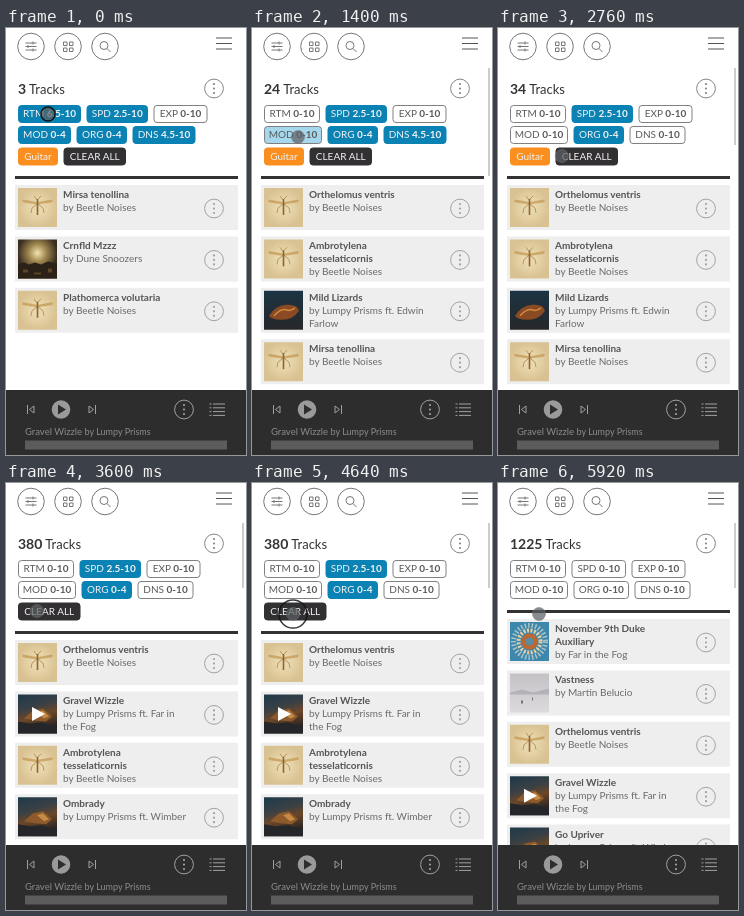
Recreate the animation shown at these times as an HTML page. Size 240 by 427 pixels, loop 6 s.

```html
<!DOCTYPE html>
<html lang="en">
<head>
<meta charset="utf-8">
<title>Track filter</title>
<style>
html, body { margin: 0; height: 100%; overflow: hidden; background: #fff; }
svg { display: block; width: 100vw; height: 100vh; }
text { font: 10px Lato, "Open Sans", sans-serif; fill: #6a6a6a; white-space: pre; }
.b { font-weight: 700; }
text.b { fill: #555; }
.line { fill: none; stroke: #777; }
.pale { fill: none; stroke: #a0a0a0; }
</style>
</head>
<body>
<svg id="stage" viewBox="0 0 240 427">
  <defs>
    <radialGradient id="paper"><stop offset=".3" stop-color="#e9d8ae"/><stop offset="1" stop-color="#d9c292"/></radialGradient>
    <radialGradient id="glow" cy=".35"><stop offset="0" stop-color="#f3e3ae"/><stop offset=".45" stop-color="#a08850"/><stop offset="1" stop-color="#3b2e20"/></radialGradient>
    <linearGradient id="night" x2="0" y2="1"><stop offset="0" stop-color="#1b3443"/><stop offset="1" stop-color="#27272b"/></linearGradient>
    <linearGradient id="dusk" x2=".3" y2="1"><stop offset="0" stop-color="#1d3a4a"/><stop offset=".4" stop-color="#3a4045"/><stop offset=".65" stop-color="#6b4728"/><stop offset="1" stop-color="#2a2422"/></linearGradient>
    <linearGradient id="haze" x2="0" y2="1"><stop offset="0" stop-color="#c3c1c5"/><stop offset="1" stop-color="#dddadd"/></linearGradient>
    <g id="bug">
      <path fill="url(#paper)" d="M0 0h39v39H0z"/>
      <path fill="#c49a55" opacity=".75" d="M19 14 5 11.500q-2 2 1 3l13 2 14-2q3-1 1-3L20 14z"/>
      <path stroke="#a27a40" stroke-width=".7" fill="none" d="M16 8l3 4 4-4M19 16l-5 4-1 5M20 16l5 4 1 5"/>
      <path stroke="#8f652f" stroke-width="1.600" d="M19.500 11v16"/>
    </g>
    <g id="field">
      <path fill="url(#glow)" d="M0 0h39v39H0z"/>
      <path fill="#2a2117" d="M0 25l6-2 5 2 6-2 6 2 7-3 9 2v15H0z"/>
      <path fill="#5b4627" d="M5 30h5v3H5zm11 3h7v2h-7zm14-4h4v4h-4z"/>
    </g>
    <g id="blobs"><path fill="#191d29" d="M0 0h39v39H0z"/></g>
    <g id="ember">
      <path fill="url(#night)" d="M0 0h39v39H0z"/>
      <path fill="#8a4a24" d="M5 25q6-10 17-11t13 6q-6 9-17 9T5 25z"/>
      <path fill="none" stroke="#d08a40" stroke-width="1.500" d="M10 25q7-8 12-6t9-2"/>
    </g>
    <g id="rock">
      <path fill="url(#dusk)" d="M0 0h39v39H0z"/>
      <path fill="#8d5a2c" d="M6 24l9-8 10-2 9 8-6 5-12-1z"/>
      <path fill="#c58a45" d="M19 18l6-2 6 6-5 2z"/>
      <path fill="#252629" d="M0 27l12 2 12-1 15 4v7H0z"/>
    </g>
    <g id="wheel">
      <path fill="#3d86ac" d="M0 0h39v39H0z"/>
      <g fill="none"><circle cx="19.500" cy="19.500" r="16" stroke="#a9c3c6" stroke-width="5" stroke-dasharray="1.500 2"/>
      <circle cx="19.500" cy="19.500" r="11" stroke="#e3cfa6" stroke-width="4" stroke-dasharray="2 1.500"/></g>
      <circle cx="19.500" cy="19.500" r="8" fill="#c0672f"/><circle cx="19.500" cy="19.500" r="4" fill="#5b8ba0"/>
    </g>
    <g id="mist">
      <path fill="url(#haze)" d="M0 0h39v39H0z"/>
      <path fill="#b4b2b8" d="M0 19l12-3 11 3 16-4v6H0z"/>
      <path fill="#77757b" d="M11 27h2v3h-2zm11-3h1v3h-1z"/>
    </g>
    <g id="kebab"><circle r="9.400" fill="none" stroke="currentColor"/>
      <path stroke="currentColor" stroke-width="2.200" stroke-linecap="round" d="M0-4.500v0M0 0v0M0 4.500v0"/></g>
  </defs>

  <g id="view"></g>

  <g class="line">
    <circle cx="25" cy="18.500" r="13.300"/><circle cx="62" cy="18.500" r="13.300"/><circle cx="99" cy="18.500" r="13.300"/>
    <path d="M19.500 15h11M19.500 18.500h11M19.500 22h11M27 13.500v3M22 17v3M27 20.500v3"/>
    <path d="M57.500 14h3.500v3.500h-3.500zM63.500 14h3.500v3.500h-3.500zM57.500 20h3.500v3.500h-3.500zM63.500 20h3.500v3.500h-3.500z"/>
    <circle cx="98" cy="17.500" r="4"/><path d="M101 20.500l3.500 3.500"/>
    <path stroke="#555" d="M210 10h16M210 15.500h16M210 21h16"/>
  </g>
  <use href="#kebab" x="208" y="60.500" color="#858585"/>

  <path fill="#2d2d2d" d="M0 362h240v65H0z"/>
  <path class="pale" d="M21.500 377v9M28 378v7l-4.500-3.500zM83 378v7l4.500-3.500zM89.500 377v9"/>
  <circle cx="55" cy="381.500" r="9.300" fill="#9a9a9a"/><path fill="#2d2d2d" d="M52 376.500v10l8-5z"/>
  <use href="#kebab" x="178" y="381.500" color="#a0a0a0"/>
  <path class="pale" d="M207 376h12M207 379.800h12M207 383.600h12M207 387.400h12M203.500 376h2M203.500 379.800h2M203.500 383.600h2M203.500 387.400h2"/>
  <text x="19" y="406.500" style="fill:#8c8c8c;font-size:9.500px">Gravel Wizzle <tspan font-size="9">by Lumpy Prisms</tspan></text>
  <path fill="#5c5c5c" d="M19 412.500h202v9H19z"/>

  <g id="touch">
    <circle r="6.500" fill="#5c5f62" fill-opacity=".72" stroke="#777" stroke-opacity=".5"/>
    <circle id="ring" fill="none" stroke="#111" stroke-width="1.500"/>
  </g>
</svg>
<script>
const $ = id => document.getElementById(id);
const LOOP = 6000;

// Small coloured discs on the dark cover
$('blobs').innerHTML += Array.from({ length: 16 }, (_, i) =>
  `<circle cx="${5 + i % 4 * 9.7}" cy="${5 + (i >> 2) * 9.7}" r="${2.5 + i * 7 % 3 * .6}"
    fill="${['#5b7d96', '#8d4d55', '#62805a', '#a99a78', '#6a5a8c'][i * 3 % 5]}"/>`).join('');

// Track: cover, bold title lines, artist lines, playing
const bug = (...title) => ['bug', title, ['by Beetle Noises']];
const mirsa = bug('Mirsa tenollina');
const orth = bug('Orthelomus ventris');
const ambro = bug('Ambrotylena', 'tesselaticornis');
const corn = ['field', ['Crnfld Mzzz'], ['by Dune Snoozers']];
const lizards = ['ember', ['Mild Lizards'], ['by Lumpy Prisms ft. Edwin', 'Farlow']];
const gravel = ['rock', ['Gravel Wizzle'], ['by Lumpy Prisms ft. Far in', 'the Fog'], true];
const few = [mirsa, corn, bug('Plathomerca volutaria')];
const many = [orth, ambro, lizards, mirsa];

const FULL = '0-10';
const states = [
  { at: 0, count: 3, values: ['6.5-10', '2.5-10', FULL, '0-4', '0-4', '4.5-10'], tag: true, clear: true, tracks: few, bar: 0 },
  { at: 280, count: 4, values: [FULL, '2.5-10', FULL, '0-4', '0-4', '4.5-10'], tag: true, clear: true, bar: 300,
    tracks: [...few, ['blobs', ['Oki Oki - Cloud Grinder'], ['by KerplunkKnob ft. Rumi', 'Hanegi']]] },
  { at: 1080, count: 24, values: [FULL, '2.5-10', FULL, FULL, '0-4', '4.5-10'], tag: true, clear: true, tracks: many, bar: 108 },
  { at: 2320, count: 34, values: [FULL, '2.5-10', FULL, FULL, '0-4', FULL], tag: true, clear: true, tracks: many, bar: 77 },
  { at: 3300, count: 380, values: [FULL, '2.5-10', FULL, FULL, '0-4', FULL], clear: true, bar: 65,
    tracks: [orth, gravel, ambro, ['rock', ['Ombrady'], ['by Lumpy Prisms ft. Wimber']]] },
  { at: 4860, count: 1225, values: Array(6).fill(FULL), bar: 65,
    tracks: [['wheel', ['November 9th Duke', 'Auxiliary'], ['by Far in the Fog']],
      ['mist', ['Vastness'], ['by Martin Belucio']], orth, gravel,
      ['rock', ['Go Upriver'], ['by Lumpy Prisms ft. Wimber']]] }
];

const chipNames = ['RTM', 'SPD', 'EXP', 'MOD', 'ORG', 'DNS'];
const chipWidths = [56, 54.5, 54, 58, 55.5, 56];
const clicks = [0, 680, 1960, 3040, 4480];
const path = [[0, 42, 86], [380, 42, 86], [640, 39, 107], [1080, 40, 107], [1400, 46, 109], [1500, 46, 109],
  [1900, 165, 107], [2540, 165, 107], [2760, 64, 128], [2940, 31, 128], [3760, 31, 128], [4400, 41, 131], [LOOP, 41, 131]];

function cursorAt(t) {
  const i = path.findIndex(p => p[0] > t);
  const [t0, x0, y0] = path[i - 1], [t1, x1, y1] = path[i];
  const k = (t - t0) / (t1 - t0);
  return [x0 + (x1 - x0) * k, y0 + (y1 - y0) * k];
}

function chip(x, y, w, label, fill) {
  const light = fill === '#fff' || fill === '#a5d8ec';
  return `<rect x="${x + .5}" y="${y + .5}" width="${w - 1}" height="17" rx="3" fill="${fill}" stroke="${light ? '#808080' : fill}"/>
    <text x="${x + w / 2}" y="${y + 12.4}" text-anchor="middle" style="fill:${light ? '#5a5a5a' : '#f2f2f2'}">${label}</text>`;
}

function chips(state, [cx, cy]) {
  let x = 12, out = '';
  state.values.forEach((value, i) => {
    if (i === 3) x = 12;
    const y = i < 3 ? 77 : 98;
    const w = chipWidths[i] + (value.includes('.') ? 7 : 0) - (value.endsWith('-4') ? 5 : 0);
    const hover = cx > x && cx < x + w && cy > y && cy < y + 18;
    const fill = value !== FULL ? '#0a82b4' : hover ? '#a5d8ec' : '#fff';
    out += chip(x, y, w, `${chipNames[i]} <tspan class="b">${value}</tspan>`, fill);
    x += w + 5.5;
  });
  if (state.tag) out += chip(12, 119.5, 40, 'Guitar', '#fa8e1e');
  if (state.clear) out += chip(state.tag ? 57.5 : 12, 119.5, 62.5, 'CLEAR ALL', '#323033');
  return out;
}

function row([cover, title, artist, playing], i) {
  const lines = [...title, ...artist].map((line, n) =>
    `<text x="57" y="${13 + n * 13}"${n < title.length ? ' class="b"' : ''}>${line}</text>`).join('');
  return `<g transform="translate(0 ${157 + i * 51.4})">
    <path fill="#eee" d="M9 0h223v45H9z"/><use href="#${cover}" x="12" y="3"/>
    ${playing ? '<path fill="#fff" d="M26 15.500v14l13-7z"/>' : ''}${lines}
    <use href="#kebab" x="208" y="23.500" color="#a2a2a2"/></g>`;
}

function draw(now) {
  const t = now % LOOP;
  const state = states.findLast(s => s.at <= t);
  const cursor = cursorAt(t);
  $('view').innerHTML = `<text x="12" y="65.500" style="font-size:13px;fill:#333"><tspan class="b" font-size="14">${state.count}</tspan> Tracks</text>
    ${chips(state, cursor)}
    <g transform="translate(0 ${state.clear ? 0 : -21})"><path fill="#343135" d="M9 148h223v3H9z"/>${state.tracks.map(row).join('')}</g>
    <rect x="236" y="40" width="2" height="${state.bar}" fill="#ccc"/>`;

  $('touch').setAttribute('transform', `translate(${cursor})`);
  const p = Math.min(1, (t - clicks.findLast(c => c <= t)) / 400);
  $('ring').setAttribute('r', 7 + 11 * (1 - (1 - p) ** 2));
  $('ring').setAttribute('opacity', 1 - p * p);
}

const start = performance.now();
function tick() {
  draw(performance.now() - start);
  requestAnimationFrame(tick);
}
tick();
</script>
</body>
</html>
```
